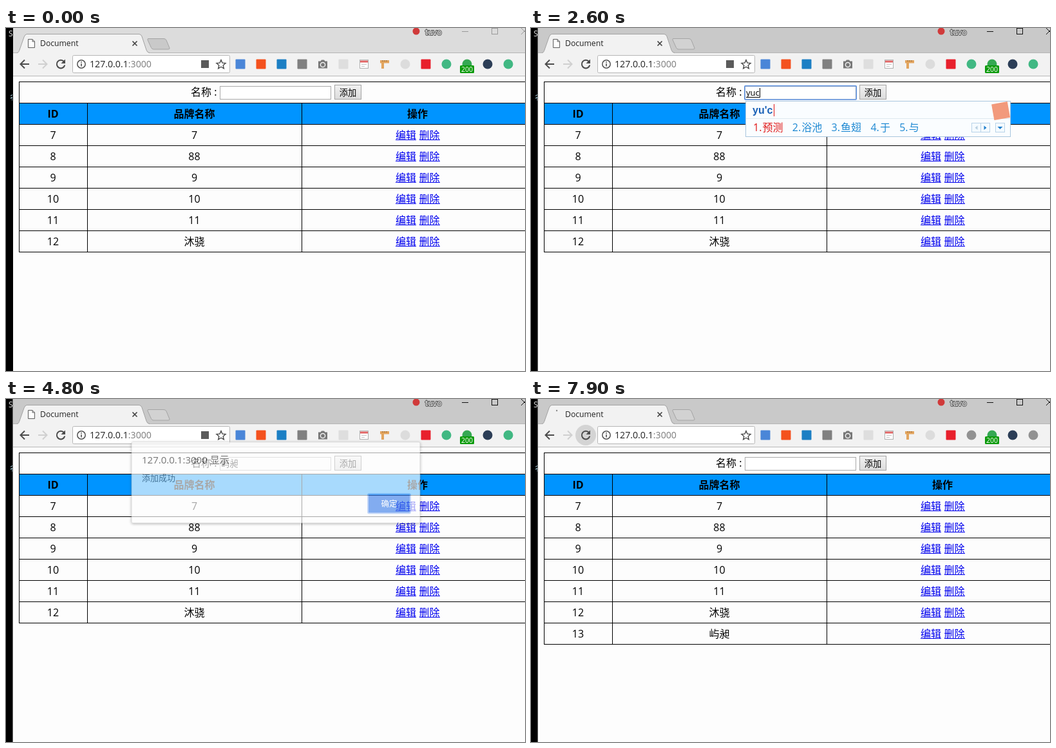
Animation, 806 px wide and 532 px high, one loop 8000 ms. Source, as an HTML page:

```html
<!DOCTYPE html>
<html lang="zh">
<head>
<meta charset="utf-8">
<title>Document</title>
<style>
html, body { margin: 0; width: 100%; height: 100%; overflow: hidden; background: #000; }
svg { display: block; }
text { font-family: "Open Sans", "Noto Sans CJK SC", "Noto Sans CJK", sans-serif; font-size: 16px; white-space: pre; }
.mid { text-anchor: middle; }
.bold { font-weight: 700; }
.crisp { shape-rendering: crispEdges; }
.line { fill: none; stroke: #4c4c4c; stroke-width: 2; }
.link { fill: #00e; }
.small { font-size: 13.33px; }
</style>
</head>
<body>
<svg width="806" height="532" viewBox="0 0 806 532">
  <defs>
    <clipPath id="desk"><rect width="10" height="532"/></clipPath>
    <linearGradient id="btnFill" x2="0" y2="1"><stop stop-color="#f1f1f1"/><stop offset="1" stop-color="#dcdcdc"/></linearGradient>
    <filter id="shadow" x="-5%" y="-15%" width="110%" height="135%"><feDropShadow dx="0" dy="1" stdDeviation="2" flood-opacity=".45"/></filter>
  </defs>

  <g clip-path="url(#desk)" fill="#e8e8e8">
    <text x="4" y="13" font-size="12" style="font-size:12px">S</text>
    <text x="4" y="112" fill="#b8e4f4" style="font-size:12px">彳</text>
  </g>

  <!-- window frame -->
  <rect id="edge" class="crisp" x="10" width="1" height="532" fill="#6e6e6e"/>
  <rect id="strip" x="11" width="795" height="38"/>
  <rect x="11" y="38" width="795" height="37" fill="#f2f2f2"/>
  <rect class="crisp" x="11" y="38" width="795" height="1" fill="#b4b4b4"/>
  <path d="M17 39C20 38 20 36 21 34L28 14Q29.500 10 32 9.500H207Q210 10 211 13L218 34Q219 38 223 39Z" fill="#f2f2f2"/>
  <path d="M17 38.500C20 38 20 36 21 34L28 14Q29.500 10 32 9.500H207Q210 10 211 13L218 34Q219 38 223 38.500" fill="none" stroke="#a2a2a2"/>
  <path id="newTab" d="M221 16.500H245Q248 16.500 249 19L254 31Q254.500 33 252 33H229Q226.500 33 225.500 30.500L220 18.500Q219.500 16.500 221 16.500Z" stroke="#a4a4a4"/>
  <g id="favicon">
    <path d="M34.500 17.500H41L44.500 21V30.500H34.500ZM41 17.500V21H44.500" fill="#fff" stroke="#5c5c5c"/>
  </g>
  <circle id="spinner" cx="40" cy="18" r="1.200" fill="#8a8a8a"/>
  <text x="53" y="28" fill="#222" style="font-size:12.200px">Document</text>
  <path d="M196.500 20.500l7 7m0-7l-7 7" stroke="#444" stroke-width="1.700"/>
  <circle cx="637" cy="5" r="5.500" fill="#d03a3a"/>
  <text x="651" y="11" fill="#fff" stroke="#555" stroke-width="2" paint-order="stroke" style="font-size:12.500px">tuvo</text>
  <path id="caption" class="crisp" d="M708 5.500H718M754.500 .5H763.500V9.500H754.500ZM800 0L810 10M810 0L800 10" fill="none"/>

  <!-- toolbar -->
  <circle id="hover" cx="85" cy="56" r="16"/>
  <path class="line" d="M36 56H23M29 49.500L22.500 56L29 62.500"/>
  <path class="line" d="M50 56H63M57 49.500L63.500 56L57 62.500" style="stroke:#d0d0d0"/>
  <path class="line" d="M90 52A6.300 6.300 0 1 0 91.300 57.500"/>
  <path d="M92 48.500V55H85.500Z" fill="#4c4c4c"/>
  <rect x="103.500" y="42.500" width="244" height="27" rx="2" fill="#fff" stroke="#b6b6b6"/>
  <circle cx="117" cy="56" r="6.200" fill="none" stroke="#505050" stroke-width="1.500"/>
  <path d="M117 55V59.500M117 52V53.700" stroke="#505050" stroke-width="1.600"/>
  <text x="130" y="61" fill="#222" style="font-size:14.150px">127.0.0.1<tspan fill="#7b7b7b">:3000</tspan></text>
  <rect id="pageTool" x="303" y="50" width="12" height="12" fill="#5b5b5b"/>
  <path d="M334 49.500L336 54.100L341 54.600L337.200 57.900L338.300 62.800L334 60.200L329.700 62.800L330.800 57.900L327 54.600L332 54.100Z" fill="none" stroke="#4a4a4a" stroke-width="1.400"/>
  <g id="tools"></g>
  <path d="M485 51.500H488.500L490 49.500H494L495.500 51.500H499V62.500H485Z" fill="#777"/>
  <circle cx="492" cy="57" r="3.600" fill="#777" stroke="#f2f2f2" stroke-width="1.500"/>
  <rect x="549.500" y="49.500" width="13" height="13" fill="#fff" stroke="#b0b0b0"/>
  <path d="M550 52H562" stroke="#e06464" stroke-width="3"/>
  <path d="M552 56.500H560M552 59.500H557" stroke="#c4c4c4"/>
  <path d="M581 50H595V54.500H587V63H583V54.500H581Z" fill="#e2a45e"/>
  <path d="M585 50V52M588 50V52M591 50V52" stroke="#8c6230"/>
  <rect x="705" y="58" width="22" height="12" rx="1.500" fill="#0a9a0a"/>
  <text class="mid" x="716" y="68" fill="#fff" style="font-size:10.500px">200</text>
  <rect class="crisp" x="11" y="74" width="795" height="1" fill="#b8b8b8"/>

  <!-- page -->
  <rect x="11" y="75" width="795" height="457" fill="#fdfdfd"/>
  <rect class="crisp" x="20" y="117" width="786" height="32" fill="#0094ff"/>
  <g id="table"></g>
  <g id="newRow"></g>
  <text x="287" y="105">名称 :</text>
  <rect id="field" x="332.500" y="90.500" width="172" height="20" fill="#fff" stroke="#a9a9a9"/>
  <rect id="focus" x="331.800" y="89.800" width="173.500" height="21.300" rx="1" fill="none" stroke="#5e93e4" stroke-width="1.500"/>
  <text id="value" x="334" y="105"></text>
  <rect id="compose" class="crisp" x="334" y="107" height="1"/>
  <rect id="caret" class="crisp" y="93" width="1" height="15"/>
  <rect id="button" x="510.500" y="88.500" width="41" height="22" fill="url(#btnFill)"/>
  <text class="mid small" x="531" y="104.500">添加</text>

  <!-- input method panel -->
  <g id="ime">
    <rect id="panel" class="crisp" x="333.500" y="113.500" height="55" fill="#fafdff" stroke="#a9c6de"/>
    <path id="rule" class="crisp" stroke="#dde8f0"/>
    <text id="pinyin" class="bold" x="344" y="133" fill="#1b62b7" style="font-family:'Liberation Sans',Arial,sans-serif"></text>
    <rect id="imeCaret" class="crisp" y="118" width="1" height="19" fill="#e01818"/>
    <g id="choices"></g>
    <g id="imeTools">
      <rect x="-28" y="3" width="25" height="25" fill="#f29a7c" transform="rotate(-10 -15 15)"/>
      <path class="crisp" d="M-60.500 34.500H-46.500V48.500H-60.500ZM-46.500 34.500H-32.500V48.500H-46.500ZM-23.500 34.500H-9.500V48.500H-23.500Z" fill="#f4faff" stroke="#b9d3e8"/>
      <path d="M-51.500 38.500V45L-55.500 41.700Z" fill="#b8cfe0"/>
      <path d="M-41.500 38.500V45L-37.500 41.700ZM-20.500 40H-12.500L-16.500 44Z" fill="#1f7fcc"/>
    </g>
  </g>

  <!-- alert -->
  <g id="dialog">
    <rect x="195" y="71.500" width="448" height="125.500" rx="2" fill="#fdfdfd" stroke="#b0b0b0" stroke-width=".6" filter="url(#shadow)"/>
    <text x="211" y="105" fill="#333" style="font-size:15px">127.0.0.1:3000 显示</text>
    <text x="211" y="132" fill="#666" style="font-size:13px">添加成功</text>
    <rect x="562" y="152" width="66" height="30" rx="2" fill="#4684ea" stroke="#a9c6f6" stroke-width="2"/>
    <text class="mid" x="595" y="172" fill="#fff" style="font-size:12.500px">确定</text>
  </g>
</svg>
<script>
const LOOP = 8000, STEP = 100;
const BRAND = "屿昶";
const el = {};
document.querySelectorAll("[id]").forEach(e => el[e.id] = e);

const text = (x, y, s, cls = "mid") => `<text class="${cls}" x="${x}" y="${y}">${s}</text>`;
const bar = (x, y, w, h, fill = "#000") => `<rect class="crisp" x="${x}" y="${y}" width="${w}" height="${h}" fill="${fill}"/>`;
const link = (x, y, s) => text(x, y, s, "link") + bar(x, y + 1, 32, 1, "#00e");

function row(i, id, name) {
  const y = 172 + i * 33;
  return text(73, y, id) + text(292.5, y, name) + link(605, y, "编辑") + link(641.5, y, "删除")
    + bar(20, y + 10, 786, 1) + [20, 126, 459].map(x => bar(x, y - 22, 1, 33)).join("");
}

el.table.innerHTML = bar(20, 83, 786, 1) + bar(20, 116, 786, 1) + bar(20, 149, 786, 1)
  + bar(20, 83, 1, 67) + bar(126, 116, 1, 34) + bar(459, 116, 1, 34)
  + text(73, 139, "ID", "mid bold") + text(292.5, 139, "品牌名称", "mid bold") + text(639, 139, "操作", "mid bold")
  + ["7", "88", "9", "10", "11", "沐骁"].map((name, i) => row(i, i + 7, name)).join("");
el.newRow.innerHTML = row(6, 13, BRAND);

// plain marks for the extension buttons: x, colour, round
const marks = [
  [364, "#4a86d8"], [396, "#f4511e"], [428, "#1c7fc4"], [460, "#808080"], [524, "#dedede"],
  [620, "#dcdcdc", 1], [652, "#e8202c"], [684, "#41b883", 1], [716, "#35a853", 1], [748, "#2c3e57", 1], [780, "#41b883", 1]
];
el.tools.innerHTML = marks.map(([x, fill, round]) =>
  `<rect x="${x - 7.5}" y="48.500" width="15" height="15" rx="${round ? 7.5 : 1}" fill="${fill}"/>`).join("");
const loadMarks = [el.tools.children[7], el.tools.children[10]];

// start, letters, split pinyin, caret x, candidates
const typing = [
  [2200, "y", "y", "一 有 也 又 要"],
  [2300, "yu", "yu", "于 与 语 鱼 雨"],
  [2600, "yuc", "yu'c", "预测 浴池 鱼翅 于 与"],
  [2700, "yuch", "yu'ch", "浴池 鱼翅 雨潮 于 与"],
  [2900, "yucha", "yu'cha", "鱼叉 预查 雨茶 鱼茶 玉茶"],
  [3000, "yuchan", "yu'chan", "预产 余产 雨蝉 玉蝉 鱼产"],
  [3100, "yuchang", "yu'chang", BRAND + " 浴场 渔场 鱼肠 雨场"]
];

const show = (e, on) => e.style.display = on ? "" : "none";
const set = (e, name, v) => e.setAttribute(name, v);
const within = (t, a, b) => t >= a && t < b;

function drawIme([, letters, split, list]) {
  let x = 345;
  el.choices.innerHTML = list.split(" ").map((word, i) => {
    const fill = i ? "#1d88d2" : "#e01818", at = x;
    x += 28.8 + 16 * word.length;
    return `<g fill="${fill}">${text(at, 160, i + 1 + ".", "")}${text(at + 14.5, 160, word, "")}</g>`;
  }).join("");
  const right = Math.max(702, Math.round(x + 128));
  set(el.panel, "width", right - 334);
  set(el.rule, "d", `M334 140.500H${right - 1}`);
  set(el.imeTools, "transform", `translate(${right} 113)`);
  el.pinyin.textContent = split;
  set(el.imeCaret, "x", Math.round(346 + el.pinyin.getComputedTextLength()));
}

function fade(t) {
  if (within(t, 4600, 6000)) return Math.min(1, (t - 4600) / 300);
  return within(t, 6000, 6300) ? 1 - (t - 5900) / 400 : 0;
}

function draw(t) {
  const active = t >= 800, added = t >= 6100, loading = t >= 7900;
  const focused = within(t, 800, 4600);
  const entry = within(t, 2200, 3300) && typing.filter(s => s[0] <= t).pop();

  set(el.strip, "fill", active ? "#c9c9c9" : "#dcdcdc");
  set(el.newTab, "fill", active ? "#d2d2d2" : "#c9c9c9");
  set(el.caption, "stroke", active ? "#111" : "#999");
  show(el.edge, active);

  show(el.focus, focused);
  el.value.textContent = entry ? entry[1] : within(t, 3300, 6100) ? BRAND : "";
  el.value.style.fontSize = entry ? "13px" : "13.33px";
  const width = el.value.textContent ? el.value.getComputedTextLength() : 0;
  show(el.compose, entry);
  set(el.compose, "width", width);
  show(el.caret, focused && !within(t, 1400, 1900) && !within(t, 3800, 4300));
  set(el.caret, "x", Math.round(334 + width));
  show(el.ime, entry);
  if (entry) drawIme(entry);

  set(el.button, "stroke", within(t, 4300, 6100) ? "#777" : "#a3a3a3");
  set(el.button, "fill", within(t, 4400, 4600) ? "#d6d6d6" : "url(#btnFill)");
  show(el.newRow, added);

  const a = fade(t);
  show(el.dialog, a > 0);
  set(el.dialog, "opacity", a);
  set(el.dialog, "transform", `translate(0 ${-14 * (1 - a)})`);

  show(el.hover, t >= 7600);
  set(el.hover, "fill", t < 7700 ? "#e6e6e6" : t < 7800 ? "#dedede" : "#d4d4d4");
  show(el.favicon, !loading);
  show(el.spinner, loading);
  show(el.pageTool, !loading);
  loadMarks.forEach(e => set(e, "fill", loading ? "#929292" : "#41b883"));
}

const start = performance.now();
let last = -1;
function tick() {
  const t = Math.floor((performance.now() - start) % LOOP / STEP) * STEP;
  if (t !== last) draw(last = t);
  requestAnimationFrame(tick);
}
tick();
</script>
</body>
</html>
```
